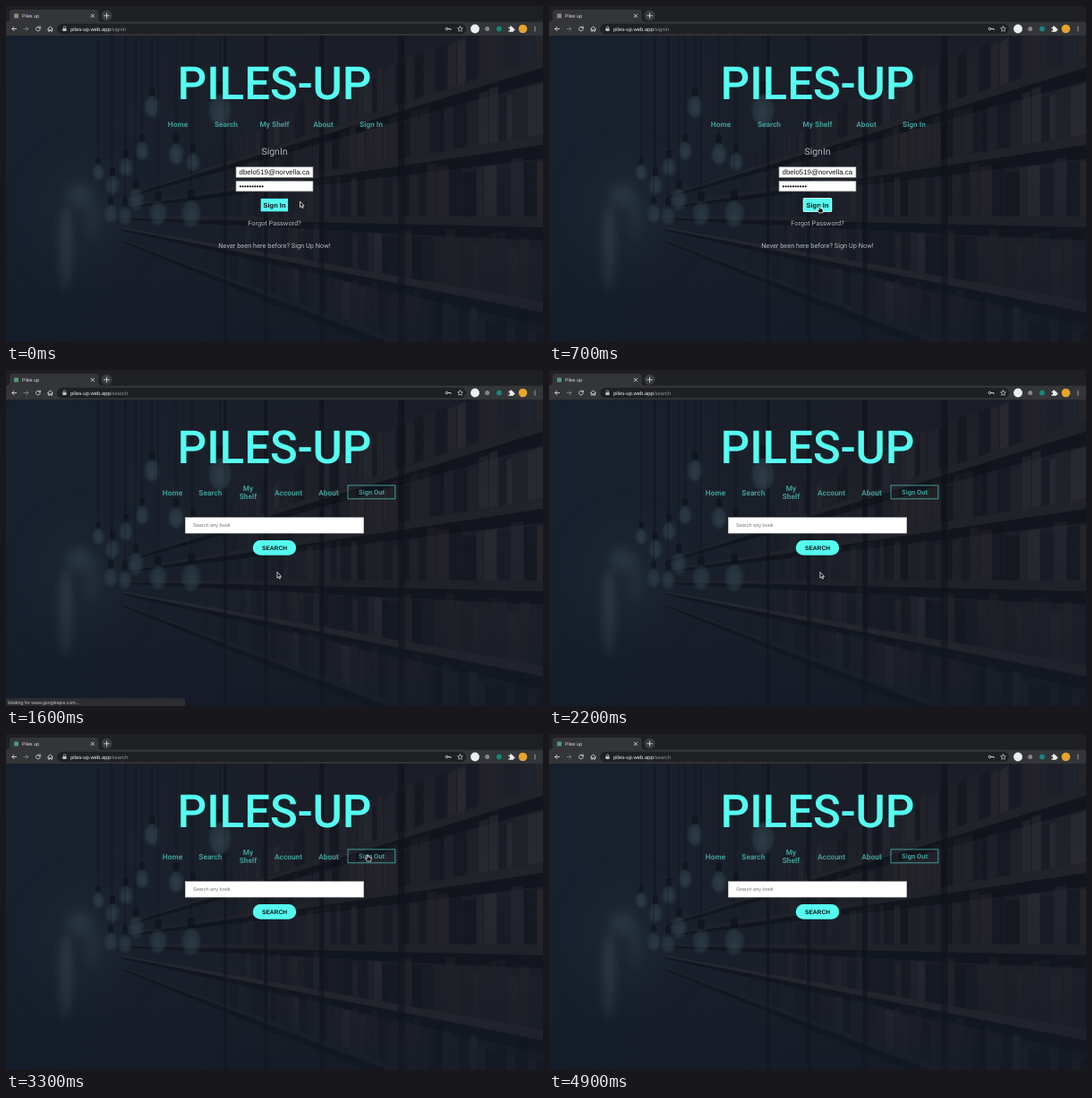
These frames come from a looping animation (600 px wide and 375 px high, 5400 ms). An HTML page with a canvas:

```html
<!DOCTYPE html>
<html lang="en">
<head>
<meta charset="utf-8">
<title>Piles up</title>
<style>
html, body { margin: 0; width: 100%; height: 100%; overflow: hidden; background: #171d29; }
canvas, svg { position: absolute; left: 0; top: 0; width: 600px; height: 375px; }
text { text-rendering: geometricPrecision; font-family: Roboto, sans-serif; }
.arial { font-family: "Liberation Sans", Arial, sans-serif; }
.mid { text-anchor: middle; }
.title { font-size: 51px; font-weight: 500; fill: #55fdf0; }
.nav { font: 700 8.33px Inter, sans-serif; fill: #409a97; text-anchor: middle; }
.body { font-size: 7.4px; fill: #b4b8bc; text-anchor: middle; }
.icon { fill: none; stroke: #d5d7da; stroke-width: .9; stroke-linecap: round; stroke-linejoin: round; }
</style>
</head>
<body>
<canvas id="photo" width="600" height="375"></canvas>
<svg viewBox="0 0 600 375">
  <defs>
    <clipPath id="field"><rect x="258" y="179" width="82.5" height="13"/></clipPath>
  </defs>

  <!-- browser bar -->
  <g id="browser">
    <rect width="600" height="18" fill="#1f2023"/>
    <path d="M0 17.5Q4 17.5 4 14V7.500Q4 4 7.500 4H100Q103.500 4 103.500 7.500V14Q103.500 17.500 107 17.500H600V33H0Z" fill="#343539"/>
    <rect id="favicon" x="9" y="8.500" width="5" height="5" rx=".6"/>
    <text class="arial" x="18" y="12.800" font-size="5.3" fill="#dfe1e4">Piles up</text>
    <path class="icon" d="M95 9.200l3.500 3.500m0-3.500l-3.500 3.500"/>
    <circle cx="112.500" cy="10.800" r="6" fill="#3a3b3f"/>
    <path class="icon" d="M109.800 10.800h5.400m-2.700-2.700v5.400"/>
    <path class="icon" d="M11.600 25.500H7m2-2.200l-2.200 2.200 2.200 2.200"/>
    <path class="icon" stroke-opacity=".45" d="M20 25.500h4.600m-2-2.200l2.200 2.200-2.200 2.200"/>
    <path class="icon" d="M38.100 24.500a2.400 2.400 0 1 0 .1 1.700m0-3.200v1.700h-1.700"/>
    <path class="icon" d="M46.500 25.600l2.900-2.600 2.900 2.600m-5 0v2.500h1.500v-1.500h1.200v1.500h1.500v-2.500"/>
    <rect x="57" y="19.800" width="457" height="11.500" rx="5.750" fill="#1f2023"/>
    <rect x="63.300" y="25" width="4.200" height="3.100" rx=".4" fill="#bfc2c6"/>
    <path d="M64.200 25v-1a1.200 1.200 0 0 1 2.400 0v1" fill="none" stroke="#bfc2c6" stroke-width=".7"/>
    <text class="arial" x="72" y="27.600" font-size="5.95" fill="#f0f1f2">piles-up.web.app<tspan id="path" fill="#8f9397">/signin</tspan></text>
    <g class="icon">
      <circle cx="492.500" cy="25.500" r="1.300"/>
      <path d="M494 25.500h3v1.200"/>
      <path d="M507.500 22.600l.9 1.900 2 .3-1.500 1.400.4 2-1.800-1-1.800 1 .4-2-1.500-1.400 2-.3z" stroke-width=".7"/>
    </g>
    <circle cx="524" cy="25.500" r="4.900" fill="#eceeee"/>
    <circle cx="537.700" cy="25.500" r="2.500" fill="#85888c"/>
    <circle cx="551" cy="25.500" r="2.900" fill="#15867e"/>
    <path d="M561.500 23.700h1.700a1.100 1.100 0 1 1 2 0h1.700v1.700a1.100 1.100 0 1 1 0 2v1.400h-5.400v-1.500a1.100 1.100 0 1 0 0-2z" fill="#eceeef"/>
    <circle cx="577.500" cy="25.500" r="4.800" fill="#e4a52a"/>
    <g fill="#d5d7da"><circle cx="591" cy="23.300" r=".65"/><circle cx="591" cy="25.500" r=".65"/><circle cx="591" cy="27.700" r=".65"/></g>
  </g>

  <text class="title mid" x="300" y="103.600">PILES-UP</text>

  <g id="login">
    <g class="nav">
      <text x="192" y="134.700">Home</text>
      <text x="246" y="134.700">Search</text>
      <text x="300" y="134.700">My Shelf</text>
      <text x="354.500" y="134.700">About</text>
      <text x="408" y="134.700">Sign In</text>
    </g>
    <text class="body" x="300" y="165.500" style="font-size:10.5px">SignIn</text>
    <g fill="#fff" stroke="#85888b" stroke-width=".7">
      <rect x="257" y="179.700" width="86" height="11.600"/>
      <rect x="257" y="195.300" width="86" height="11.600"/>
    </g>
    <g clip-path="url(#field)"><text class="arial" x="260.500" y="188" font-size="7.9" fill="#111">dbelo519@norvella.ca</text></g>
    <text class="arial" x="260.500" y="203.900" font-size="7.9" fill="#111">••••••••••</text>
    <g id="ring">
      <rect x="283" y="213.400" width="34" height="17.400" rx="2.200" fill="#10151d"/>
      <rect x="283.700" y="214.100" width="32.600" height="16" rx="1.600" fill="#e6eeee"/>
    </g>
    <rect x="284.700" y="214.900" width="30.400" height="14.400" fill="#55fbef"/>
    <text id="submit" class="arial mid" x="300" y="224.800" font-size="7.5" font-weight="700">Sign In</text>
    <text class="body" x="300" y="245">Forgot Password?</text>
    <text class="body" x="300" y="270">Never been here before? Sign Up Now!</text>
  </g>

  <g id="search">
    <g class="nav">
      <text x="186" y="139.500">Home</text>
      <text x="228.300" y="139.500">Search</text>
      <text x="270.500" y="134.600">My</text>
      <text x="270.500" y="144.300">Shelf</text>
      <text x="315.500" y="139.500">Account</text>
      <text x="360.500" y="139.500">About</text>
      <text x="408.500" y="138.700" style="font-size:7.5px;font-weight:600">Sign Out</text>
    </g>
    <rect x="382" y="128.800" width="52.800" height="15" fill="none" stroke="#409a97" stroke-width="1"/>
    <rect x="200.300" y="164.700" width="199.400" height="17.400" fill="#fff" stroke="#c9cbcd" stroke-width=".5"/>
    <text class="arial" x="209" y="175.400" font-size="5.55" fill="#757575">Search any book</text>
    <rect x="275.800" y="190" width="48.400" height="16.800" rx="8.400" fill="#55fbef"/>
    <text class="arial mid" x="300" y="200.700" font-size="6.67" font-weight="700" fill="#0c1218">SEARCH</text>
  </g>

  <g id="status">
    <path d="M0 366.300H198Q200 366.300 200 368.300V375H0Z" fill="#2d2e32"/>
    <text class="arial" x="2" y="372.700" font-size="5.25" fill="#c3c5c8">Waiting for www.googleapis.com...</text>
  </g>

  <g id="cursor" stroke="#fff" fill="#0b0c0e" stroke-linejoin="round">
    <path id="arrow" stroke-width=".75" d="M0 0V6.600L1.500 5.300 2.500 7.600 3.600 7.100 2.600 4.900H4.600Z"/>
    <path id="hand" stroke-width=".7" d="M-.7 .7Q0-.4.700.700V2.800L3 3.200Q4.400 3.500 4.200 5L3.700 7.800H-.4L-2.300 5.100Q-2.400 4-1.500 4.300L-.7 5Z"/>
  </g>
</svg>

<script>
const el = id => document.getElementById(id);
const LOOP = 5400, STEP = 100;

function paintPhoto() {
  const c = el("photo").getContext("2d");
  let seed = 11;
  const rnd = () => (seed = (seed * 16807) % 2147483647) / 2147483647;
  const wash = (x0, y0, x1, y1, stops) => {
    const g = c.createLinearGradient(x0, y0, x1, y1);
    stops.forEach((s, i) => g.addColorStop(i / (stops.length - 1), s));
    c.fillStyle = g;
    c.fillRect(0, 0, 600, 375);
  };
  const poly = (pts, color) => {
    c.fillStyle = color;
    c.beginPath();
    pts.forEach(p => c.lineTo(p[0], p[1]));
    c.fill();
  };
  const blob = (x, y, rx, ry, color, blur) => {
    c.filter = `blur(${blur}px)`;
    c.fillStyle = color;
    c.beginPath();
    c.ellipse(x, y, rx, ry, 0, 0, 7);
    c.fill();
    c.filter = "none";
  };

  wash(0, 0, 600, 0, ["#182130", "#1a212c", "#1b1f28", "#1b1e27", "#1c2029"]);

  // shelves run towards one vanishing point at the left
  const vx = 60, vy = 235;
  const at = (slope, x) => vy + slope * (x - vx);
  const rows = [-.5, -.33, -.17, 0, .176, .36];
  for (let r = 1; r < rows.length; r++) {
    const low = rows[r], gap = low - rows[r - 1];
    c.filter = "blur(.6px)";
    for (let x = 215; x < 600;) {
      const w = (x - vx) * (.015 + rnd() * .022);
      const top = low - gap * (.6 + rnd() * .25);
      const tone = rnd(), alpha = Math.min(1, (x - 190) / 190) * (.12 + rnd() * .32);
      const color = tone < .3 ? `rgba(12,15,22,${alpha})`
        : tone < .75 ? `rgba(55,46,46,${alpha})` : `rgba(62,60,64,${alpha})`;
      poly([[x, at(top, x)], [x + w - 1, at(top, x + w)], [x + w - 1, at(low, x + w)], [x, at(low, x)]], color);
      x += w;
    }
    poly([[130, at(low, 130)], [600, at(low, 600)], [600, at(low + .022, 600)], [130, at(low + .022, 130)]],
      r === 4 ? "rgba(57,53,55,.55)" : "rgba(47,43,47,.4)");
    poly([[130, at(low + .022, 130)], [600, at(low + .022, 600)], [600, at(low + .05, 600)], [130, at(low + .05, 130)]],
      "rgba(12,16,23,.6)");
    c.filter = "none";
  }
  for (const x of [243, 288, 350, 438]) {
    const w = (x - vx) * .02;
    poly([[x, 33], [x + w, 33], [x + w, 375], [x, 375]], "rgba(14,18,25,.6)");
    poly([[x + w, 33], [x + w + 1, 33], [x + w + 1, 375], [x + w, 375]], "rgba(56,52,56,.18)");
  }

  // hazy light at the far end
  blob(85, 235, 45, 60, "rgba(44,58,70,.25)", 22);
  blob(67, 270, 8, 48, "rgba(57,75,87,.6)", 5);
  blob(82, 212, 15, 13, "rgba(58,76,88,.5)", 6);
  blob(96, 235, 9, 24, "rgba(48,65,77,.4)", 6);

  // hanging bulbs: x, y, half width
  const bulbs = [[163, 110, 8], [239, 113, 12], [190, 163, 8], [209, 172, 7], [152, 160, 7], [134, 178, 7],
    [119, 198, 7], [170, 229, 9], [207, 229, 10], [145, 214, 8], [133, 232, 7], [117, 230, 7], [103, 184, 6]];
  for (const [x, y, r] of bulbs) {
    c.strokeStyle = "rgba(10,14,21,.42)";
    c.lineWidth = 1;
    c.beginPath();
    c.moveTo(x, 33);
    c.lineTo(x, y - r * 2.2);
    c.stroke();
    c.fillStyle = "rgba(11,15,22,.6)";
    c.fillRect(x - r * .4, y - r * 2.4, r * .8, r * 1.2);
    blob(x, y + r * .3, r, r * 1.45, "rgba(54,73,84,.5)", 1.6);
    blob(x, y + r * .5, r * .5, r * .8, "rgba(68,88,99,.22)", 2);
  }
  wash(0, 33, 0, 375, ["rgba(20,26,37,.12)", "rgba(20,26,37,0)", "rgba(19,26,38,.2)", "rgba(19,26,38,.65)"]);
}

// time, x, y of the pointer tip
const trail = [[100, 328.5, 218], [500, 302, 223], [1100, 302, 223], [1400, 304, 226], [1500, 304, 226],
  [1600, 303, 225.5], [2300, 303, 225.5], [2800, 319, 196.5], [2900, 319, 196.5],
  [3300, 404, 134.3], [3500, 405, 134], [LOOP, 405, 134]];
const loginHot = [[284, 214, 316, 230]];
const searchHot = [[276, 190, 324, 207], [382, 128, 435, 144]];

function pointer(t) {
  const i = trail.findIndex(p => p[0] >= t);
  const b = trail[i], a = trail[i - 1] || b;
  const k = b === a ? 1 : (t - a[0]) / (b[0] - a[0]);
  return [a[1] + (b[1] - a[1]) * k, a[2] + (b[2] - a[2]) * k];
}

const show = (id, on) => el(id).setAttribute("display", on ? "inline" : "none");

function draw(t) {
  const signedIn = t >= 1600;
  show("login", !signedIn);
  show("search", signedIn);
  show("ring", t >= 700);
  show("status", signedIn && t < 2000);
  el("path").textContent = signedIn ? "/search" : "/signin";
  el("favicon").setAttribute("fill", t < 900 ? "#8c8870" : "#579673");

  const k = Math.max(0, Math.min(1, (t - 700) / 300));
  const mix = (from, to) => Math.round(from + (to - from) * k);
  el("submit").setAttribute("fill", `rgb(${mix(12, 220)},${mix(18, 255)},${mix(24, 252)})`);

  const [x, y] = pointer(t);
  const over = (signedIn ? searchHot : loginHot)
    .some(([l, top, r, b]) => x > l && x < r && y > top && y < b);
  show("cursor", t < 4800);
  show("hand", over);
  show("arrow", !over);
  el("cursor").setAttribute("transform", `translate(${x.toFixed(2)} ${y.toFixed(2)})`);
}

paintPhoto();
const start = performance.now();
function tick() {
  const t = (performance.now() - start) % LOOP;
  draw(Math.floor(t / STEP) * STEP);
  requestAnimationFrame(tick);
}
tick();
</script>
</body>
</html>
```
